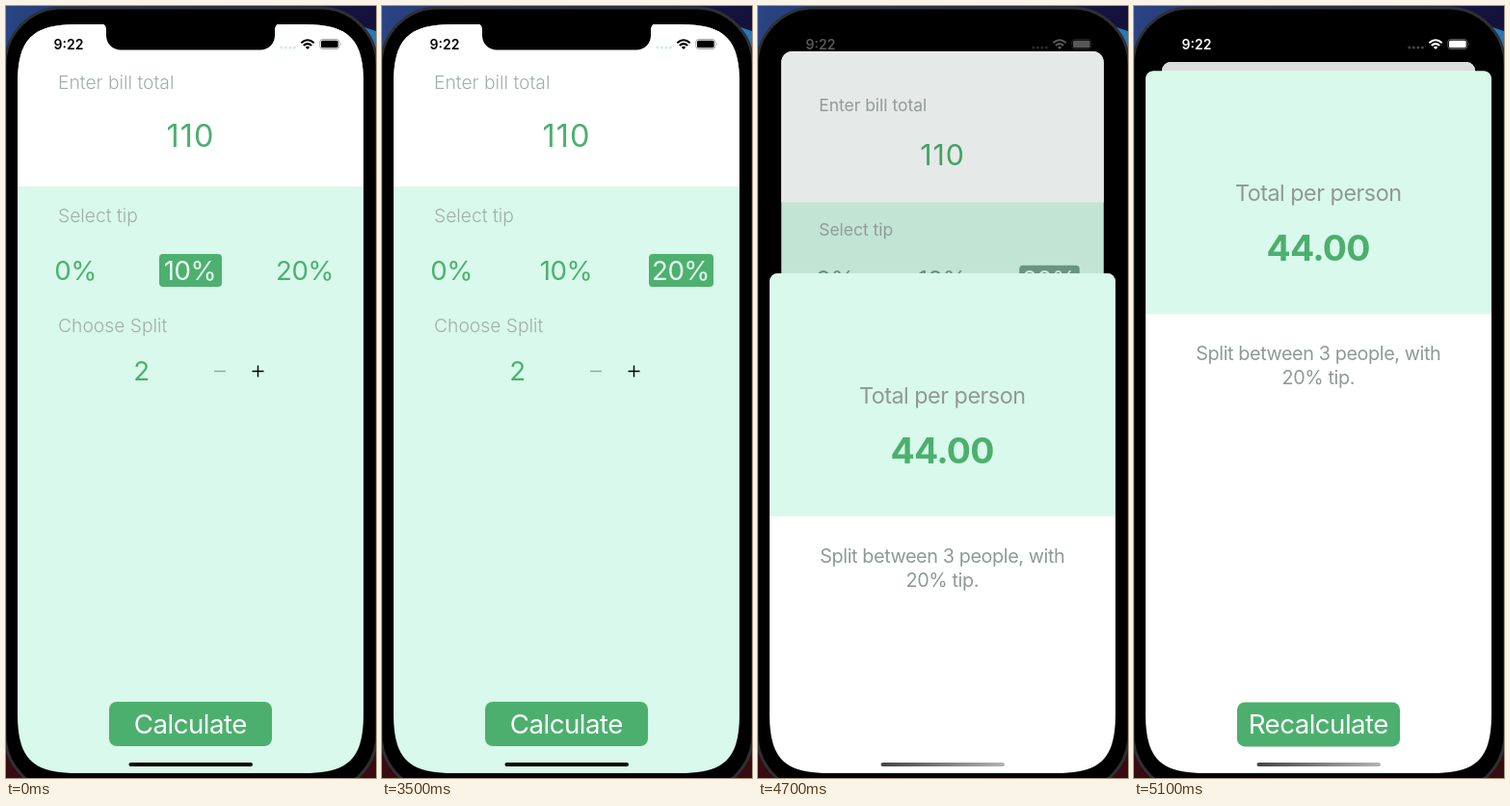
Animation, 384 px wide and 800 px high, one loop 5.2 s. Source, as an HTML page:

```html
<!DOCTYPE html>
<html lang="en">
<head>
<meta charset="utf-8">
<title>Tip calculator</title>
<style>
  html, body { margin: 0; width: 100%; height: 100%; overflow: hidden; background: #000; }
  svg { display: block; width: 384px; height: 800px; font-family: Inter, Roboto, sans-serif; }
  .mid { text-anchor: middle; }
  .big { font-size: 27.7px; letter-spacing: -.02em; text-anchor: middle; }
  .label { font-size: 18.7px; fill: #a0a9a5; }
  .idle .label { font-size: 19.3px; font-weight: 300; fill: #a2aea8; }
  .green { fill: #4caf6e; }
  .mint { fill: #d8f9eb; }
  .note { font-size: 19.8px; letter-spacing: -.02em; fill: #8f9995; text-anchor: middle; }
</style>
</head>
<body>
<svg viewBox="0 0 384 800">
  <defs>
    <linearGradient id="sky">
      <stop offset="0" stop-color="#2a4584"/>
      <stop offset=".5" stop-color="#1a2358"/>
      <stop offset="1" stop-color="#14113a"/>
    </linearGradient>
    <linearGradient id="grip">
      <stop offset="0" stop-color="#444"/>
      <stop offset="1" stop-color="#b4b4b4"/>
    </linearGradient>
    <clipPath id="screen">
      <path d="M12 81C12 34 27 19 74 19H309C356 19 371 34 371 81V733C371 780 356 795 309 795H74C27 795 12 780 12 733Z"/>
    </clipPath>
    <clipPath id="cardClip"><rect id="cardShape" x="12" y="19" width="359" height="776"/></clipPath>
  </defs>

  <rect width="384" height="800" fill="#380a12"/>
  <rect width="384" height="400" fill="url(#sky)"/>
  <path d="M366 20L384 26V48Z" fill="#2a78b4"/>
  <rect x="-1" y="2" width="386" height="812" rx="59" stroke="#2f3033" stroke-width="3"/>

  <g clip-path="url(#screen)">
    <rect width="384" height="800"/>
    <g id="card" clip-path="url(#cardClip)">
      <rect x="12" y="19" width="359" height="776" class="mint"/>
      <rect x="12" y="19" width="359" height="168" fill="#fff"/>
      <text x="54" y="86" class="label">Enter bill total</text>
      <text x="191.5" y="145.5" class="green mid" font-size="32.5" letter-spacing=".03em">110</text>
      <text x="54" y="224" class="label">Select tip</text>
      <rect id="mark" y="257" height="34" rx="4"/>
      <g id="tips" class="big">
        <text x="72" y="283.5">0%</text>
        <text x="191" y="283.5">10%</text>
        <text x="310" y="283.5">20%</text>
      </g>
      <text x="54" y="338" class="label">Choose Split</text>
      <text id="count" x="140.5" y="388" class="big green"></text>
      <path id="minus" d="M216 378.5h12" stroke-width="1.4"/>
      <path d="M255.5 378.5h12m-6-6v12" stroke="#000" stroke-width="1.4"/>
      <rect x="107" y="721" width="169" height="46" rx="8" class="green"/>
      <text id="calc" x="191.3" y="754" class="big" fill="#fff">Calculate</text>
      <rect id="dim" x="12" y="19" width="359" height="776" fill="#002819"/>
    </g>

    <g id="sheet">
      <rect x="12" width="359" height="800" rx="8" fill="#fff"/>
      <path d="M12 251.5V8a8 8 0 0 1 8-8H363a8 8 0 0 1 8 8V251.5Z" class="mint"/>
      <text x="191.2" y="134.7" class="mid" font-size="23.3" letter-spacing="-.02em" fill="#8f9995">Total per person</text>
      <text x="191" y="196.4" class="green mid" font-size="37.3" font-weight="700" letter-spacing="-.02em">44.00</text>
      <text x="191.3" y="300" class="note">Split between 3 people, with</text>
      <text x="191.3" y="325" class="note">20% tip.</text>
      <rect x="107" y="654" width="169" height="46" rx="8" class="green"/>
      <text x="191.3" y="686.7" class="big" fill="#fff">Recalculate</text>
    </g>

    <path d="M99 18q5 1 5 7v5a15 15 0 0 0 15 15.5H264a15 15 0 0 0 15-15.5v-5q0-6 5-7Z"/>
    <rect id="home" x="127.5" y="784" width="128.5" height="4" rx="2"/>
    <g id="status">
      <text x="49.5" y="44.5" font-size="14" font-weight="600">9:22</text>
      <g fill="none" stroke="currentColor" stroke-width="2">
        <path d="M306.3 38.2q6.7-6 13.4 0M308.8 41q4.2-3.8 8.4 0"/>
        <rect x="325.8" y="34.5" width="20" height="10" rx="2.8" stroke-width="1" stroke-opacity=".35"/>
      </g>
      <path d="M310.8 42.8q2.2-1.9 4.4 0L313 45Z"/>
      <rect x="327" y="35.7" width="17.6" height="7.6" rx="1.6"/>
      <path d="M347 38v3q1.4-1.5 0-3" opacity=".5"/>
    </g>
    <path id="dots" d="M285.8 43h13.6" stroke-width="3.2" stroke-linecap="round" stroke-dasharray="0 4.5"/>
  </g>
</svg>
<script>
  const LOOP = 5200, STEP = 100;
  const TIP = 1900, SPLIT = 3600, PRESS = 4400, OPEN = 4563;
  const $ = id => document.getElementById(id);
  const set = (id, attrs) => {
    for (const name in attrs) $(id).setAttribute(name, attrs[name]);
  };
  const mix = (a, b, k) => `rgb(${a.map((v, i) => Math.round(v + (b[i] - v) * k))})`;
  const GREEN = [78, 176, 111], MUTED = [116, 160, 140];
  const tips = [...$('tips').children];

  // Critically damped spring from 0 to 1
  function spring(ms) {
    const x = Math.max(0, ms) * 0.01826;
    return 1 - (1 + x) * Math.exp(-x);
  }

  function draw(t) {
    const p = spring(t - OPEN);
    const open = p > 0;
    const picked = t < TIP ? 1 : 2;
    const split = t < SPLIT ? 2 : 3;
    const scale = 1 - 34 / 359 * p;
    const tint = mix(GREEN, MUTED, Math.min(1, p * 1.4));

    $('card').setAttribute('class', open ? '' : 'idle');
    set('card', { transform: `translate(191.5 ${19 + 39 * p}) scale(${scale}) translate(-191.5 -19)` });
    set('cardShape', { rx: 10 + 35 * (1 - p) ** 2 });
    set('dim', { opacity: 0.145 * p });
    set('mark', { x: picked === 1 ? 159 : 277, width: picked === 1 ? 65 : 67, fill: tint });
    tips.forEach((tip, i) => tip.setAttribute('fill', i === picked ? '#e4fbf1' : tint));
    $('count').textContent = split;
    set('minus', { stroke: split > 2 ? '#000' : '#8fa39a' });
    set('calc', { opacity: t >= PRESS ? 0.2 : 1 });

    set('sheet', {
      transform: `translate(0 ${800 - 733 * p})`,
      visibility: open ? 'visible' : 'hidden'
    });

    const k = Math.min(1, Math.max(0, (t - OPEN) / 350));
    const ink = mix([0, 0, 0], [255, 255, 255], k * k * (3 - 2 * k));
    set('status', { fill: ink, color: ink });
    set('dots', { stroke: open ? mix([20, 20, 20], [68, 68, 68], k) : '#cdeedd' });
    set('home', { fill: open ? 'url(#grip)' : '#000' });
  }

  const start = performance.now();
  function frame() {
    const t = (performance.now() - start) % LOOP;
    draw(Math.floor(t / STEP) * STEP);
    requestAnimationFrame(frame);
  }
  frame();
</script>
</body>
</html>
```
